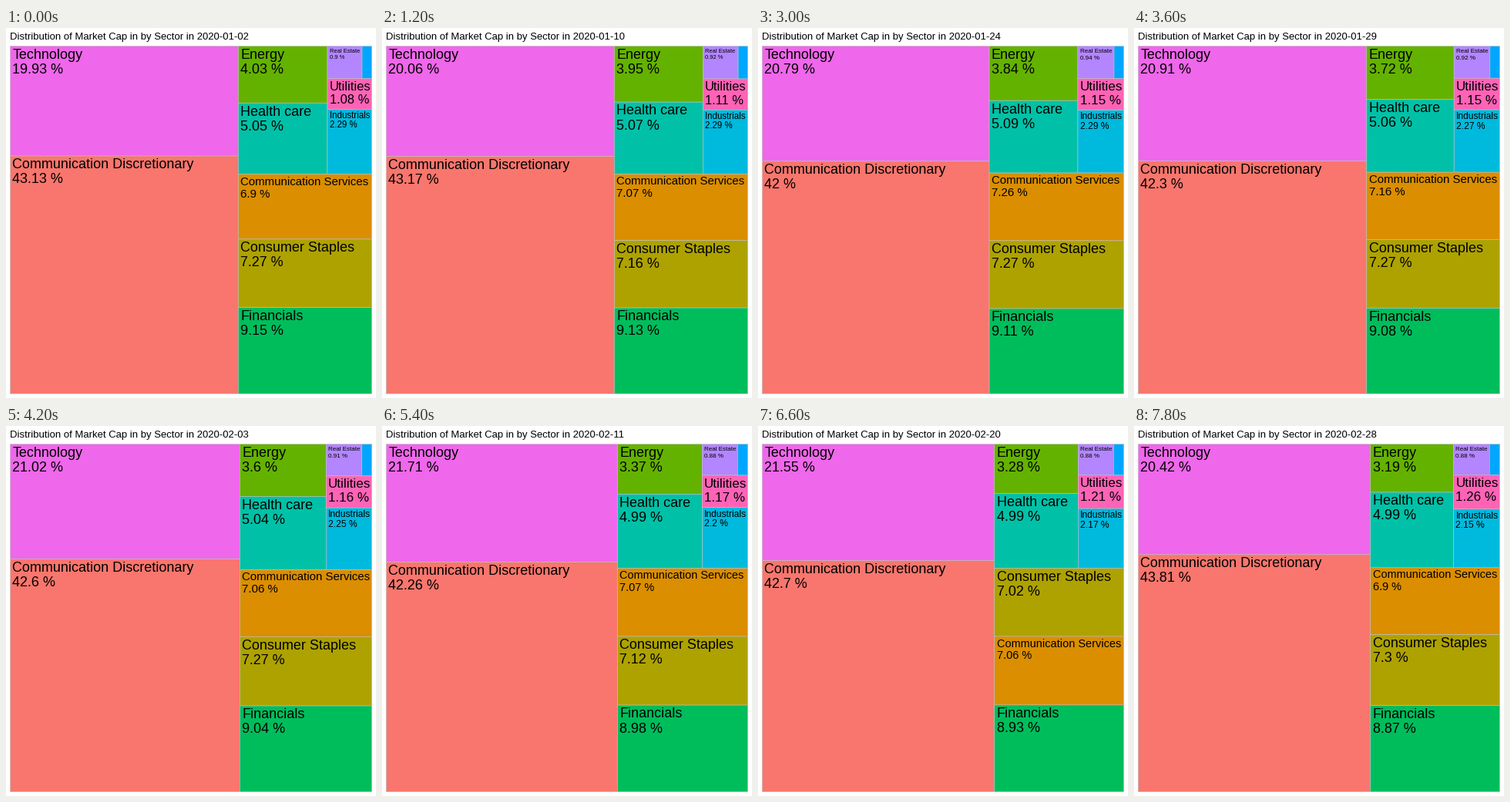
Animation of 480 by 480 pixels, one loop 8000 ms. Source, as a matplotlib script:

```python
import numpy as np
import matplotlib.pyplot as plt
from matplotlib.animation import FuncAnimation
from matplotlib.patches import Rectangle
from matplotlib.textpath import TextPath

plt.rcParams["font.family"] = "Liberation Sans"

DPI, SIZE = 96, 480
PT = 72 / DPI                 # points per pixel
FULL_SIZE = 18
PAD = 2.83                    # 1 mm text padding
PANEL = (5.5, 23.5, 474.5, 474.5)

COLORS = {
    "Technology": "#EF67EB",
    "Communication Discretionary": "#F8766D",
    "Energy": "#64B200",
    "Health care": "#00C1A7",
    "Real Estate": "#B385FF",
    "Materials": "#00A6FF",
    "Utilities": "#FF63B6",
    "Industrials": "#00BADE",
    "Communication Services": "#DB8E00",
    "Consumer Staples": "#AEA200",
    "Financials": "#00BD5C",
}

# Percent at the key steps; a shorter list uses evenly skipped keys
KEY_STEPS = [0, 3, 5, 7, 9, 11, 13]
SHARES = {
    "Technology": [19.93, 20.13, 20.79, 21.02, 21.71, 21.55, 20.42],
    "Communication Discretionary": [43.13, 43.19, 42, 42.6, 42.26, 42.7, 43.81],
    "Communication Services": [6.9, 7.15, 7.26, 7.06, 7.07, 7.06, 6.9],
    "Consumer Staples": [7.27, 7.1, 7.27, 7.27, 7.12, 7.02, 7.3],
    "Energy": [4.03, 3.84, 3.37, 3.19],
    "Health care": [5.05, 5.09, 4.99, 4.99],
    "Real Estate": [0.9, 0.94, 0.88, 0.88],
    "Utilities": [1.08, 1.15, 1.17, 1.26],
    "Industrials": [2.29, 2.29, 2.2, 2.15],
    "Financials": [9.15, 9.11, 8.98, 8.87],
    "Materials": [0.25, 0.25],
}

FRAME_MS = 200
FRAMES_PER_STEP = 3
FRAMES = 40


def date_at(step):
    """Every step is three trading days."""
    return np.busday_offset("2020-01-02", 3 * step,
                            holidays=["2020-01-20", "2020-02-17"])


def share_at(step, values):
    keys = KEY_STEPS[::(len(KEY_STEPS) - 1) // (len(values) - 1)]
    return round(float(np.interp(step, keys, values)), 2)


def split(box, weights, vertical):
    """Cut a box (x0, y0, x1, y1) into parts in proportion to the weights."""
    x0, y0, x1, y1 = box
    stops = np.concatenate([[0], np.cumsum(weights)]) / sum(weights)
    pairs = list(zip(stops, stops[1:]))
    if vertical:
        h = y1 - y0
        return [(x0, y0 + a * h, x1, y0 + b * h) for a, b in pairs]
    w = x1 - x0
    return [(x0 + a * w, y0, x0 + b * w, y1) for a, b in pairs]


def layout(share):
    boxes = {}

    def divide(box, groups, vertical):
        weights = [sum(share[n] for n in group) for group in groups]
        return split(box, weights, vertical)

    def place(box, names, vertical=True):
        boxes.update(zip(names, divide(box, [[n] for n in names], vertical)))

    large = ["Technology", "Communication Discretionary"]
    pair = ["Energy", "Health care"]
    tiny = ["Real Estate", "Materials"]
    small = ["Utilities", "Industrials"]
    middle = sorted(["Communication Services", "Consumer Staples", "Financials"],
                    key=share.get)

    left, right = divide(PANEL, [large, pair + tiny + small + middle], False)
    upper, lower = divide(right, [pair + tiny + small, middle], True)
    inner, outer = divide(upper, [pair, tiny + small], False)
    corner, rest = divide(outer, [tiny, small], True)

    place(left, large)
    place(lower, middle)
    place(inner, pair)
    place(corner, tiny, False)
    place(rest, small)
    return boxes


def fit_size(ink_width, room):
    """Largest half-pixel font size that fits, up to the full size."""
    return min(FULL_SIZE, np.floor(2 * FULL_SIZE * room / ink_width) / 2)


INK_WIDTHS = {name: TextPath((0, 0), name, size=FULL_SIZE).get_extents().width
              for name in COLORS}

fig = plt.figure(figsize=(SIZE / DPI, SIZE / DPI), dpi=DPI, facecolor="white")
ax = fig.add_axes([0, 0, 1, 1])


def write(x, y, text, size):
    ax.text(x, y, text, fontsize=size * PT, color="black", va="baseline")


def draw(frame):
    ax.clear()
    ax.set_xlim(0, SIZE)
    ax.set_ylim(SIZE, 0)
    ax.axis("off")

    step = frame // FRAMES_PER_STEP
    share = {name: share_at(step, values) for name, values in SHARES.items()}
    write(5, 15, f"Distribution of Market Cap in by Sector in {date_at(step)}", 13.1)

    for name, (x0, y0, x1, y1) in layout(share).items():
        ax.add_patch(Rectangle((x0, y0), x1 - x0, y1 - y0, facecolor=COLORS[name],
                               edgecolor="#BEBEBE", linewidth=0.6 * PT, snap=False))
        if name == "Materials":   # too narrow for a label
            continue
        size = fit_size(INK_WIDTHS[name], x1 - x0 - 2 * PAD)
        base = y0 + PAD + 0.75 * size
        write(x0 + PAD, base, name, size)
        write(x0 + PAD, base + 1.06 * size, f"{share[name]:g} %", size)
    return []


anim = FuncAnimation(fig, draw, frames=FRAMES, interval=FRAME_MS,
                     init_func=lambda: [], repeat=True, repeat_delay=0)
plt.show()
```
